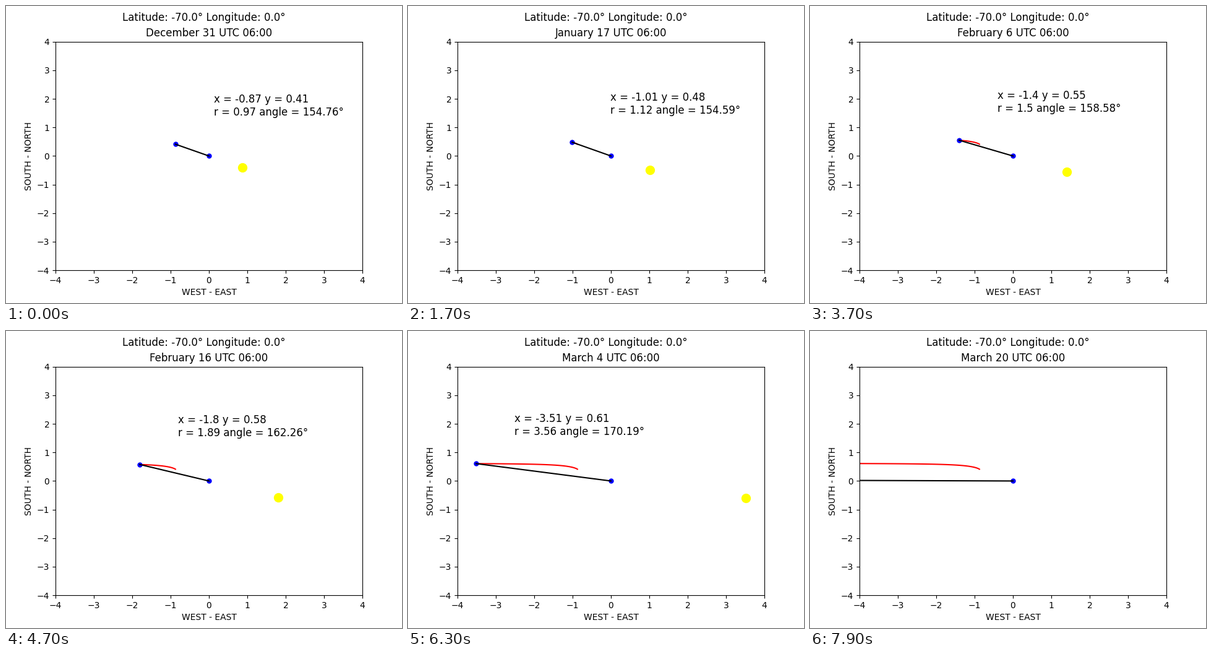
Recreate the animation shown at these times as a matplotlib script. Size 640 by 480 pixels, loop 8 s.

```python
import numpy as np
import matplotlib.pyplot as plt
from matplotlib.animation import FuncAnimation

FRAMES = 80
LAT, LON = -70.0, 0.0
TILT = np.radians(23.44)
MONTHS = [("December", 31), ("January", 31), ("February", 28), ("March", 31)]


def shadow_tip(day):
    """Tip of a unit gnomon's shadow at 06:00, days counted from December 31."""
    u = 63 - day
    drift = 2.6e-6 * np.maximum(u, 0) ** 2 * (u - 48)
    a = np.radians(16.207 + u * 360 / 365 + drift)  # arc left to the equinox
    east = np.cos(a) ** 2 + np.cos(TILT) * np.sin(a) ** 2
    lag = (1 - np.cos(TILT)) * np.sin(a) * np.cos(a)
    south = np.sin(TILT) * np.sin(a)
    c, s = np.cos(np.radians(LAT)), -np.sin(np.radians(LAT))
    up = s * south - c * lag
    return -c * east / up, (c * south + s * lag) / up


def date_text(day):
    n = 31 + day
    for name, length in MONTHS:
        if n <= length:
            return f"{name} {n} UTC 06:00"
        n -= length


xs, ys = shadow_tip(np.arange(FRAMES))

fig, ax = plt.subplots(figsize=(6.4, 4.8), dpi=100)
fig.suptitle(f"Latitude: {LAT}° Longitude: {LON}°", fontsize=12)
ax.set(xlim=(-4, 4), ylim=(-4, 4), xlabel="WEST - EAST", ylabel="SOUTH - NORTH")
title = ax.set_title("", fontsize=12)

trail, = ax.plot([], [], color="red", lw=1.5)
sun, = ax.plot([], [], "o", color="yellow", ms=10)
dots, = ax.plot([], [], "o", color="blue", ms=5)
rod, = ax.plot([], [], color="black", lw=1.5)
label = ax.text(0, 0, "", fontsize=12)


def update(i):
    x, y = xs[i], ys[i]
    r = round(float(np.hypot(x, y)), 2)
    angle = round(float(np.degrees(np.arctan2(y, x))), 2)
    title.set_text(date_text(i))
    trail.set_data(xs[:i + 1], ys[:i + 1])
    sun.set_data([-x], [-y])
    dots.set_data([0, x], [0, y])
    rod.set_data([0, x], [0, y])
    label.set_position((x + 1, y + 1))
    label.set_text(f"x = {round(float(x), 2)} y = {round(float(y), 2)}\n"
                   f"r = {r} angle = {angle}°")
    return title, trail, sun, dots, rod, label


anim = FuncAnimation(fig, update, frames=FRAMES, interval=100,
                     repeat=True, repeat_delay=0, blit=False)
plt.show()
```
